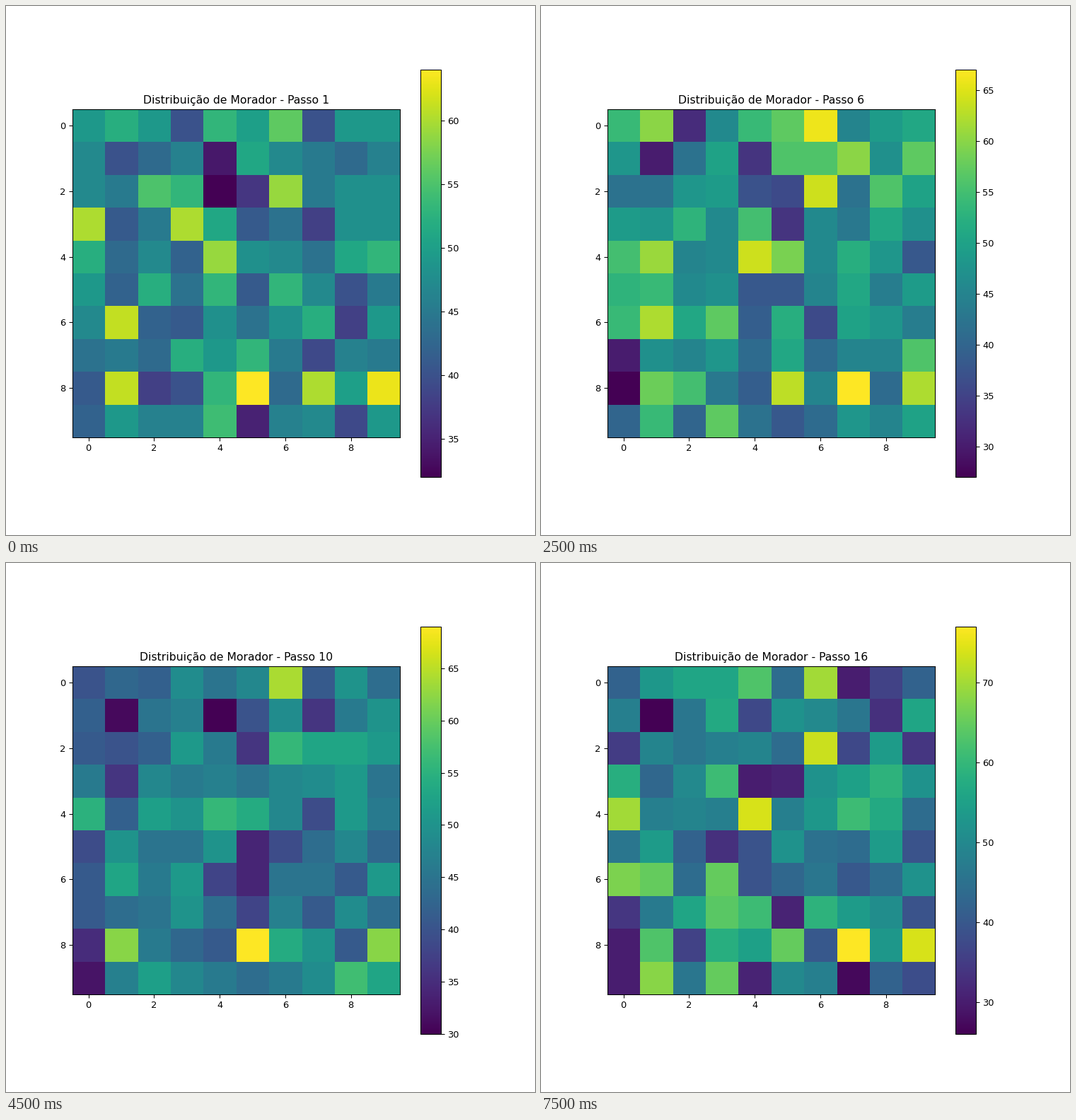
These frames come from a looping animation (748x748 px, 8 s). A matplotlib script:

```python
import matplotlib.pyplot as plt
import numpy as np
from matplotlib.animation import FuncAnimation

STAGE = 748
INCHES = 8
N = 10
STEPS = 16
STEP_MS = 500
TYPICAL = 47

# Lowest and highest population at each step
LIMITS = [(32, 64), (30, 64), (30, 65), (28, 65), (27, 69), (27, 67),
          (30, 68), (26, 65), (28, 68), (30, 69), (27, 69), (29, 65),
          (26, 69), (26, 73), (28, 71), (26, 77)]

# Cells that tend to stay crowded or empty, as (rows, columns)
BUSY = (8, 8, 8, 8, 6, 4, 4, 2, 0), (1, 5, 7, 9, 1, 0, 4, 6, 6)
QUIET = (7, 9, 8, 1, 3, 1, 0), (0, 0, 0, 1, 5, 4, 7)


def population(step):
    """Residents per cell: local habit plus noise, fitted to the limits."""
    rng = np.random.default_rng(step)
    cells = rng.normal(TYPICAL, 5, (N, N))
    cells[BUSY] += 10
    cells[QUIET] -= 9
    low, high = LIMITS[step - 1]
    fitted = np.interp(cells, (cells.min(), TYPICAL, cells.max()),
                       (low, TYPICAL, high))
    return np.rint(fitted)


fig, ax = plt.subplots(figsize=(INCHES, INCHES), dpi=STAGE / INCHES)
image = ax.imshow(population(1), cmap="viridis", interpolation="nearest")
fig.colorbar(image, ax=ax)
title = ax.set_title("")


def update(i):
    image.set_data(population(i + 1))
    image.set_clim(*LIMITS[i])
    title.set_text(f"Distribuição de Morador - Passo {i + 1}")
    return image, title


anim = FuncAnimation(fig, update, frames=STEPS, interval=STEP_MS,
                     repeat=True, repeat_delay=0, blit=False)
plt.show()
```
